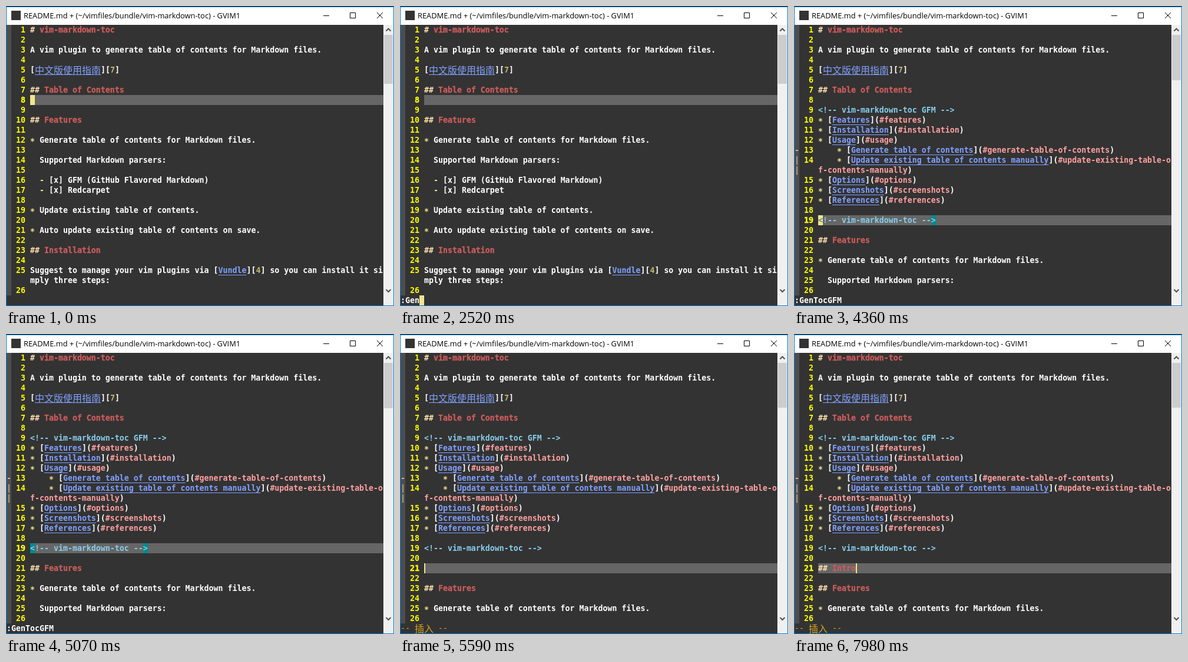
These frames come from a looping animation (659 by 509 pixels, 8 s). An HTML page:

```html
<!DOCTYPE html>
<html lang="en">
<head>
<meta charset="utf-8">
<title>GVIM</title>
<style>
html, body { margin: 0; width: 100%; height: 100%; overflow: hidden; }
#win { position: relative; width: 659px; height: 509px; background: #333; overflow: hidden; }
#win div { position: absolute; }
#bar { left: 0; top: 0; width: 659px; height: 32px; background: #fff; }
#name { left: 30px; top: 7px; font: 12.85px/19px "Open Sans", sans-serif; white-space: pre; }
#icon { left: 9px; top: 8px; width: 16px; height: 16px; background: #333; }
#frame { inset: 0; border: 1px solid #0078d7; border-top: 0; box-shadow: inset 0 1px #222, inset 0 2px #0078d7; }
svg { position: absolute; left: 0; top: 0; fill: none; }
#fold { left: 1px; top: 32px; width: 8px; height: 459px; background: #4d4d4d; }
#scroll { left: 641px; top: 32px; width: 17px; height: 476px; background: #f0f0f0; }
#thumb { left: 642px; top: 49px; width: 15px; background: #cdcdcd; }
#text div { height: 17px; white-space: pre; color: #fff;
  font: bold 13.288px/17px "DejaVu Sans Mono", monospace; font-variant-ligatures: none; }
#text .num { color: #ff0; }
#text .tan { color: #d2b48c; }
#text .mode { color: #daa520; font-weight: normal; }
#text .line { width: 600px; }
#text .now { background: #666; }
#text .now.num { background: none; -webkit-text-stroke: .5px #ff0; }
#text .cursor { background: #f0e68c; color: #708090; overflow: hidden; }
.comment { color: #87ceeb; }
.head { color: #cd5c5c; -webkit-text-stroke: .3px #cd5c5c; }
.hash { color: #ffdead; }
.mark { color: #f0e68c; }
.star { color: #f0e68c; position: relative; top: 2px; }
.link { color: #80a0ff; text-decoration: underline 1px; text-underline-offset: 3px; text-decoration-skip-ink: none; }
.url { color: #ffa0a0; }
.id { color: #bdb76b; }
.pair { background: #008b8b; display: inline-block; height: 17px; vertical-align: top; }
.cjk { font: 16px/17px "Noto Sans CJK SC", "Noto Sans CJK", sans-serif; display: inline-block; height: 17px; vertical-align: top; }
.mode .cjk { font-weight: 500; }
.link.cjk { text-decoration: none; box-shadow: inset 0 -1px #80a0ff; }
</style>
</head>
<body>
<div id="win">
  <div id="bar"></div>
  <div id="icon"></div>
  <div id="name">README.md + (~/vimfiles/bundle/vim-markdown-toc) - GVIM1</div>
  <div id="fold"></div>
  <div id="text"></div>
  <div id="scroll"></div>
  <div id="thumb"></div>
  <svg width="659" height="509">
    <path stroke="#000" d="M539 16.5h10M584.5 11.5h9v9h-9zM630 11l10 10M640 11l-10 10"/>
    <path stroke="#505050" stroke-width="2" d="M645.5 42.5l4-4 4 4M645.5 481l4 4 4-4"/>
  </svg>
  <div id="frame"></div>
</div>
<script>
const ROW = 17, COL = 8, LEFT = 41, TOP = 32, WRAP = 75, ROWS = 27;

const head = `# vim-markdown-toc

A vim plugin to generate table of contents for Markdown files.

[中文版使用指南][7]

## Table of Contents
`.split("\n");

const body = `
## Features

* Generate table of contents for Markdown files.

  Supported Markdown parsers:

  - [x] GFM (GitHub Flavored Markdown)
  - [x] Redcarpet

* Update existing table of contents.

* Auto update existing table of contents on save.

## Installation

Suggest to manage your vim plugins via [Vundle][4] so you can install it simply three steps:
`.split("\n");

const item = (name, pad = "") =>
  `${pad}* [${name}](#${name.toLowerCase().replaceAll(" ", "-")})`;
const toc = [
  "<!-- vim-markdown-toc GFM -->",
  ...["Features", "Installation", "Usage"].map(n => item(n)),
  item("Generate table of contents", "    "),
  item("Update existing table of contents manually", "    "),
  ...["Options", "Screenshots", "References"].map(n => item(n)),
  "",
  "<!-- vim-markdown-toc -->",
];
const withToc = (...added) => [...head, ...toc, ...added, ...body];

// Timeline: [start, state]
const steps = [];
const add = (t, state) => steps.push([t, state]);

const before = { lines: [...head, ...body], line: 7, thumb: 132 };
[0, 540, 800, 1200, 1460].forEach((t, i) =>
  add(t, { ...before, cursor: i % 2 ? "" : "block" }));
[[1860, ""], [2260, "G"], [2390, "Ge"], [2520, "Gen"], [2950, "GenT"],
 [3350, "GenTo"], [3480, "GenTocG"], [3610, "GenTocGFM"]].forEach(([t, cmd]) =>
  add(t, { ...before, cmd: ":" + cmd, typing: true }));

const made = { lines: withToc(), line: 18, thumb: 126, folds: true, pair: true, cmd: ":GenTocGFM" };
add(4360, { ...made, cursor: "block" });
add(5070, made);

const insert = { cursor: "bar", folds: true, insert: true };
add(5200, { ...insert, lines: withToc(""), line: 19, thumb: 126 });
[[5590, ""], [6000, "#"], [6130, "##"], [6800, "##", ""], [7060, "## "], [7330, "## I"],
 [7590, "## In"], [7850, "## Int"], [7980, "## Intro"]].forEach(([t, text, cursor = "bar"]) =>
  add(t, { ...insert, cursor, lines: withToc("", text), line: 20, col: text.length, thumb: 125 }));

// Splits a line into [class, text] parts
function highlight(s, pair) {
  if (s.startsWith("<!--"))
    return pair
      ? [["comment pair", s[0]], ["comment", s.slice(1, -1)], ["comment pair", s.at(-1)]]
      : [["comment", s]];
  let m = s.match(/^(#+)(.*)/);
  if (m) return [["hash", m[1]], ["head", m[2]]];
  const parts = [];
  if (m = s.match(/^( *)([*-])(?= )/)) {
    parts.push(["", m[1]], [m[2] === "*" ? "star" : "mark", m[2]]);
    s = s.slice(m[0].length);
  }
  s.split(/(\[)([^\]]+)(\][(\[])([^)\]]+)([)\]])/).forEach((p, i) => {
    const kind = i % 6;
    const link = /[一-龥]/.test(p) ? "link cjk" : "link";
    parts.push([kind === 2 ? link : kind === 4 ? (p[0] === "#" ? "url" : "id") : "", p]);
  });
  return parts;
}

function wrap(parts) {
  const rows = [[]];
  let room = WRAP;
  for (let [cls, text] of parts)
    while (text) {
      if (!room) { rows.push([]); room = WRAP; }
      const cut = text.slice(0, room);
      rows.at(-1).push([cls, cut]);
      room -= cut.length;
      text = text.slice(cut.length);
    }
  return rows;
}

const esc = s => s.replace(/&/g, "&amp;").replace(/</g, "&lt;");
const span = ([cls, text]) => `<span class="${cls}">${esc(text)}</span>`;
const box = (x, row, cls, html, width = "") =>
  `<div class="${cls}" style="left:${x}px;top:${TOP + row * ROW}px;${width && `width:${width}px`}">${html}</div>`;

function render(s) {
  let html = "", row = 0;
  s.lines.forEach((line, i) => {
    const now = i === s.line ? " now" : "";
    const first = row;
    for (const parts of wrap(highlight(line, s.pair && now))) {
      if (row >= ROWS) return;
      if (row === first) html += box(9, row, "num" + now, String(i + 1).padStart(3));
      if (s.folds && (i === 12 || i === 13)) html += box(1, row, "tan", i === 12 ? "-" : "|");
      html += box(LEFT, row, "line" + now, parts.map(span).join(""));
      row++;
    }
    if (now && s.cursor) {
      const block = s.cursor === "block";
      html += box(LEFT + (s.col || 0) * COL, first, "cursor", block ? esc(line[0] || "") : "", block ? COL : 2);
    }
  });
  if (s.insert) html += box(1, ROWS, "mode", '-- <span class="cjk">插入</span> --');
  if (s.cmd) html += box(1, ROWS, "", s.cmd);
  if (s.typing) html += box(1 + s.cmd.length * COL, ROWS, "cursor", "", COL);
  document.getElementById("text").innerHTML = html;
  document.getElementById("thumb").style.height = s.thumb - 49 + "px";
}

let shown;
function tick() {
  const t = performance.now() % 8000;
  const state = steps.findLast(([start]) => start <= t)[1];
  if (state !== shown) render(shown = state);
  requestAnimationFrame(tick);
}
tick();
</script>
</body>
</html>
```
